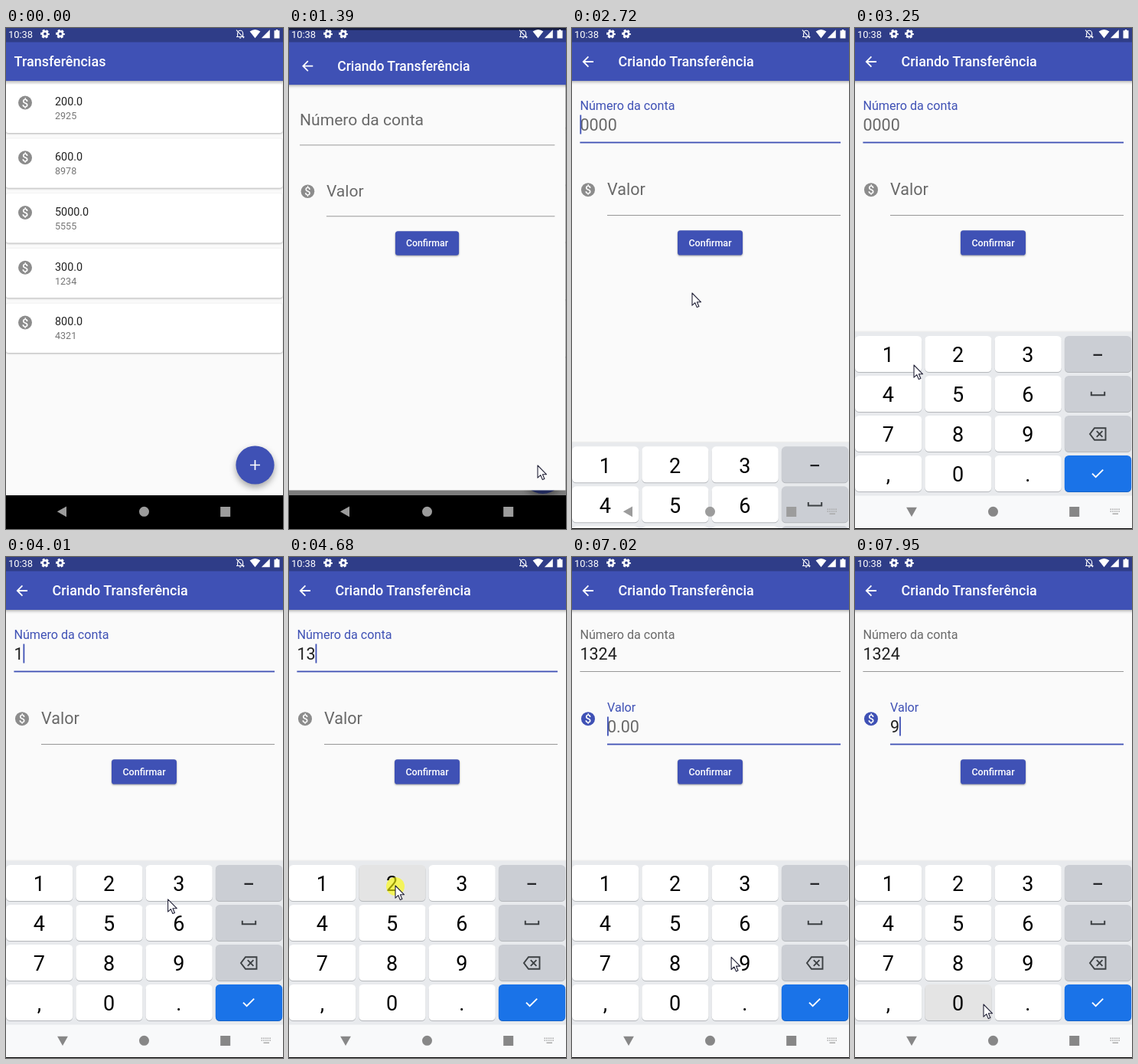
Write an HTML page that moves like this. It is 362 px wide and 654 px high and loops after 8000 ms.

```html
<!DOCTYPE html>
<html lang="pt">
<head>
<meta charset="utf-8">
<style>
html, body { margin: 0; width: 100%; height: 100%; overflow: hidden; background: #000; }
svg { display: block; width: 362px; height: 654px; font-family: Roboto, sans-serif; }
.bar { filter: drop-shadow(0 1.5px 2px rgba(0,0,0,.38)); }
.card { filter: drop-shadow(0 1px .8px rgba(0,0,0,.3)); }
.fab { filter: drop-shadow(0 4px 4px rgba(0,0,0,.35)); }
.btn { filter: drop-shadow(0 1.2px 1.2px rgba(0,0,0,.38)); }
</style>
</head>
<body>
<svg id="stage" viewBox="0 0 362 654"></svg>
<script>
const LOOP = 8000, BLUE = '#3f51b5', GREY = '#8c8c8c', DIM = '#696969';
const stage = document.getElementById('stage');
const $ = id => document.getElementById(id);
const set = (id, attrs) => { for (const k in attrs) $(id).setAttribute(k, attrs[k]); };
const clamp = v => Math.min(1, Math.max(0, v));
const span = (t, from, len) => clamp((t - from) / len);
const mix = (a, b, p) => a + (b - a) * p;

const bezier = (x1, y1, x2, y2) => x => {
  const at = (a, b, u) => 3 * (1 - u) ** 2 * u * a + 3 * (1 - u) * u * u * b + u ** 3;
  let lo = 0, hi = 1;
  for (let i = 0; i < 24; i++) {
    const m = (lo + hi) / 2;
    if (at(x1, x2, m) < x) lo = m; else hi = m;
  }
  return at(y1, y2, lo);
};
const standard = bezier(.4, 0, .2, 1);
const zoomIn = bezier(.05, 0, .1333, .06), zoomOut = bezier(.2083, .82, .25, 1);
const zoom = p => p < 1 / 6 ? .4 * zoomIn(p * 6) : .4 + .6 * zoomOut((p - 1 / 6) * 1.2);

// Drawing helpers
const text = (x, y, size, s, extra = '') => `<text x="${x}" y="${y}" font-size="${size}" ${extra}>${s}</text>`;
const rect = (x, y, w, h, fill, extra = '') => `<rect x="${x}" y="${y}" width="${w}" height="${h}" fill="${fill}" ${extra}/>`;
const line = (d, color, w, extra = '') => `<path d="${d}" fill="none" stroke="${color}" stroke-width="${w}" ${extra}/>`;
const coin = (x, y, bg, id = 'none') => `<circle ${id === 'none' ? '' : `id="${id}"`} cx="${x}" cy="${y}" r="9" fill="${GREY}"/>` +
  text(x, y + 5.2, 15, '$', `fill="${bg}" text-anchor="middle" font-weight="500"`);
const appBar = (x, title) => rect(-8, -4, 378, 73, BLUE, 'class="bar"') +
  text(x, 50.2, 17.95, title, 'fill="#fff" font-weight="500"');

const transfers = [['200.0', 2925], ['600.0', 8978], ['5000.0', 5555], ['300.0', 1234], ['800.0', 4321]];
const listPage = rect(-8, 0, 378, 612, '#fafafa') + transfers.map(([value, account], i) =>
  `<g transform="translate(0 ${i * 71.75})">` +
  rect(-.4, 72.5, 362, 64.4, '#fff', 'rx="3.6" class="card"') + coin(25, 97.5, '#fff') +
  text(64, 101.3, 14.36, value, 'fill="#212121"') + text(64, 119.3, 12.56, account, 'fill="#757575"') + '</g>').join('') +
  appBar(10.6, 'Transferências') +
  `<circle cx="325.5" cy="570.5" r="25.1" fill="${BLUE}" class="fab"/>` +
  '<circle id="splash" cx="325.5" cy="570.5" fill="#fff"/>' +
  line('M319 570.5h13M325.5 564v13', '#fff', 1.7);

const field = (id, x, y, label, hint) =>
  `<text id="${id}Label" font-size="21.53">${label}</text>` +
  text(x, y - 15.9, 21.53, hint, `id="${id}Hint" fill="${DIM}"`) +
  text(x, y - 15.9, 21.53, '', `id="${id}Text" fill="#212121"`) +
  `<rect id="${id}Line" x="${x}" width="${351 - x}"/>`;
const formPage = rect(-4, 0, 369.3, 610, '#fafafa') + appBar(60.6, 'Criando Transferência') +
  line('M28 44H15.2M21.4 37.4L14.8 44l6.6 6.6', '#fff', 1.8) +
  field('num', 10.4, 149.5, 'Número da conta', '0000') +
  coin(21, 211.2, '#fafafa', 'coin') + field('val', 46, 244.5, 'Valor', '0.00') +
  '<rect id="caret" width="1.8" height="25"/>' +
  rect(138, 264.3, 85, 32.3, BLUE, 'rx="3.6" class="btn"') +
  text(180.5, 285, 12.56, 'Confirmar', 'fill="#fff" font-weight="500" text-anchor="middle"');

const keys = ['1', '2', '3', '', '4', '5', '6', '', '7', '8', '9', '', ',', '0', '.', ''];
const keyFill = (c, i) => c ? '#fff' : i === 15 ? '#1a73e8' : '#cbced4';
const keyboard = rect(0, 395.5, 362, 2, '#000', 'opacity=".05"') + rect(0, 397, 362, 214, '#e8eaed') +
  rect(0, 610.5, 362, 44, '#f8f9fa') +
  keys.map((c, i) => {
    const x = (i % 4) * 91.3, y = 402 + (i >> 2) * 52;
    return rect(x, y + 1, 87.2, 47, i === 15 ? '#1663c7' : '#b4b7bb', 'rx="5.5"') +
      rect(x, y, 87.2, 47, keyFill(c, i), `rx="5.5" id="key${i}"`) +
      (c ? text(x + 43.3, y + 34.4, 27, c, 'fill="#000" text-anchor="middle"') : '');
  }).join('') +
  line('M311.5 426.8h11.5', '#202124', 2.2) +
  line('M308.8 474.8v4.4h17.4v-4.4', '#3c4043', 2) +
  line('M313 522.2h14.5v15.6H313l-6-7.8zM315.8 526.2l7.6 7.6m0-7.6l-7.6 7.6', '#3c4043', 1.9) +
  line('M310 581.6l4.6 4.6 9.6-9.6', '#fff', 1.9);

const gear = x => `<g fill="none" stroke="#fff"><circle cx="${x}" cy="7.7" r="3.2" stroke-width="2.6"/>` +
  `<circle cx="${x}" cy="7.7" r="4.9" stroke-width="2" stroke-dasharray="2.9 2.231" stroke-dashoffset="1.45"/></g>`;
const status = rect(0, 0, 362, 18.5, '#000', 'opacity=".25"') +
  text(3, 13, 12.9, '10:38', 'fill="#fff"') + gear(51) + gear(71) +
  line('M302.6 11.2v-4a3.5 4 0 0 1 7 0v4M301 11.5h10.4M301 2.6l10 10.6', '#fff', 1.1) +
  '<path fill="#fff" d="M304.8 12.5h2.6a1.3 1.3 0 0 1-2.6 0zM318.6 4.6q6.9-5 13.8 0l-6.9 8.6zM344.8 2.2v11h-11zM352.8 2h2.4v1.3h2.3v10.2h-7V3.300h2.300z"/>';

const nav = '<g id="nav"><path id="back" d="M66.800 631.300L79 624.400v13.800z"/><circle cx="180.500" cy="631.300" r="6.500"/>' +
  rect(280.2, 625, 13, 13, 'inherit').replace('fill="inherit" ', '') +
  '<g id="ime"><path fill="none" stroke="#aaa" stroke-width="1.500" stroke-dasharray="1.600 1.100" d="M333.500 628.300h13.500M333.500 631.100h13.500"/>' +
  '<path fill="none" stroke="#aaa" stroke-width="1.500" d="M336.500 634.200h7.500"/></g></g>';

stage.innerHTML = `<defs><clipPath id="screen"><rect width="362" height="653"/></clipPath></defs>
  <g id="list">${listPage}</g>
  <rect id="scrim" width="362" height="611"/>
  <g id="form">${formPage}</g>${status}
  ${rect(0, 610, 362, 44, '#000')}
  <g clip-path="url(#screen)"><g id="board">${keyboard}</g></g>${nav}
  <circle id="tap" r="12" fill="#ff0" opacity=".6"/>
  <path id="cursor" d="M0 0V16.200L3.800 12.700L6.300 18.600L8.900 17.500L6.400 11.800H11.600Z" fill="#fff" stroke="#222238" stroke-width="1.100" stroke-linejoin="round"/>`;

// Timeline: time, x, y
const path = [
  [310, 326, 656], [740, 325, 571], [1640, 325, 571], [2340, 150, 128], [2520, 150, 130], [2720, 157, 346],
  [3250, 77, 440], [3620, 55, 443], [3810, 55, 443], [4030, 215, 447], [4180, 213, 446], [4390, 152, 432],
  [4600, 139, 429], [4760, 139, 429], [4960, 50, 468], [5180, 52, 468], [5790, 132, 196], [5990, 132, 196],
  [6880, 205, 520], [7280, 216, 528], [7470, 216, 528], [7740, 168, 584], [LOOP, 168, 584]
];
// Taps: start, end, key index
const taps = [
  [980, 1230], [2390, 2490], [3680, 3780, 0], [4060, 4160, 2], [4640, 4710, 1],
  [5010, 5110, 4], [5830, 5950], [7340, 7440, 10], [7870, 7945, 13]
];
const OPEN = 1276, FOCUS_NUM = 2510, FOCUS_VAL = 6005, LAG = 30;

function pointer(t) {
  let i = 0;
  while (i < path.length - 2 && t >= path[i + 1][0]) i++;
  const [a, b] = [path[i], path[i + 1]];
  const p = span(t, a[0], b[0] - a[0]), e = p * p * (3 - 2 * p);
  return [mix(a[1], b[1], e), mix(a[2], b[2], e)];
}

function drawField(id, x, y, value, focus, focused) {
  const p = standard(focus), color = focused ? BLUE : DIM;
  set(id + 'Label', {
    transform: `translate(${x} ${mix(y - 26.4, y - 42.7, p)}) scale(${mix(1, .75, p)})`, fill: color
  });
  set(id + 'Hint', { opacity: value ? 0 : p });
  $(id + 'Text').textContent = value;
  const h = focused ? 1.8 : .95;
  set(id + 'Line', { y: y - h / 2, height: h, fill: focused ? BLUE : '#929292' });
}

function render(t) {
  const p = span(t, OPEN, 300), z = zoom(p);
  const scaled = s => `translate(180.65 305) scale(${s}) translate(-180.65 -305)`;
  set('list', { transform: scaled(mix(1, 1.05, z)), visibility: p < 1 ? 'visible' : 'hidden' });
  set('scrim', { opacity: p < 1 ? .6 * span(p, .2075, .21) : 0 });
  set('form', { transform: scaled(mix(.85, 1, z)), opacity: span(p, .125, .125) });
  set('splash', { r: 25.1 * Math.sqrt(span(t, 980, 300)), opacity: t < 980 ? 0 : .22 * (1 - span(t, 1250, 150)) });

  // Typed values, and the moment the caret last restarted
  let num = '', val = '', blink = t < FOCUS_VAL ? FOCUS_NUM : FOCUS_VAL;
  for (const [start, end, key] of taps) {
    if (key === undefined) continue;
    const typed = end + LAG;
    if (t >= typed) {
      if (typed < FOCUS_VAL) num += keys[key]; else val += keys[key];
      blink = Math.max(blink, typed);
    }
    const shade = t < start ? 0 : 1 - span(t, end + 20, 90), c = Math.round(255 - 27 * shade);
    set('key' + key, { fill: `rgb(${c},${c},${c})` });
  }
  const onVal = t >= FOCUS_VAL, onNum = t >= FOCUS_NUM && !onVal;
  drawField('num', 10.4, 149.5, num, span(t, FOCUS_NUM, 190), onNum);
  drawField('val', 46, 244.5, val, span(t, FOCUS_VAL, 190), onVal);
  set('coin', { fill: onVal ? BLUE : GREY });
  const lit = (onNum || onVal) && Math.floor((t - blink) / 500) % 2 === 0;
  set('caret', {
    x: (onVal ? 46 : 10.4) + 12.07 * (onVal ? val : num).length, y: onVal ? 208.5 : 113.5,
    fill: BLUE, opacity: lit ? 1 : 0
  });

  const up = 1 - (1 - span(t, 2672, 280)) ** 3;
  set('board', { transform: `translate(0 ${257 * (1 - up)})`, visibility: up ? 'visible' : 'hidden' });
  const turn = standard(span(t, 2730, 200));
  set('back', { transform: `rotate(${-90 * turn} 73.7 631)` });
  set('nav', { fill: turn > .5 ? '#878787' : '#9c9c9c' });
  set('ime', { opacity: t >= 2640 ? 1 : 0 });

  const [x, y] = pointer(t);
  set('cursor', { transform: `translate(${x} ${y})`, visibility: t > 310 ? 'visible' : 'hidden' });
  const down = taps.some(([a, b]) => t >= a && t < b);
  set('tap', { cx: x, cy: y + 1, visibility: down ? 'visible' : 'hidden' });
}

const begin = performance.now();
function tick() {
  render((performance.now() - begin) % LOOP);
  requestAnimationFrame(tick);
}
tick();
</script>
</body>
</html>
```
